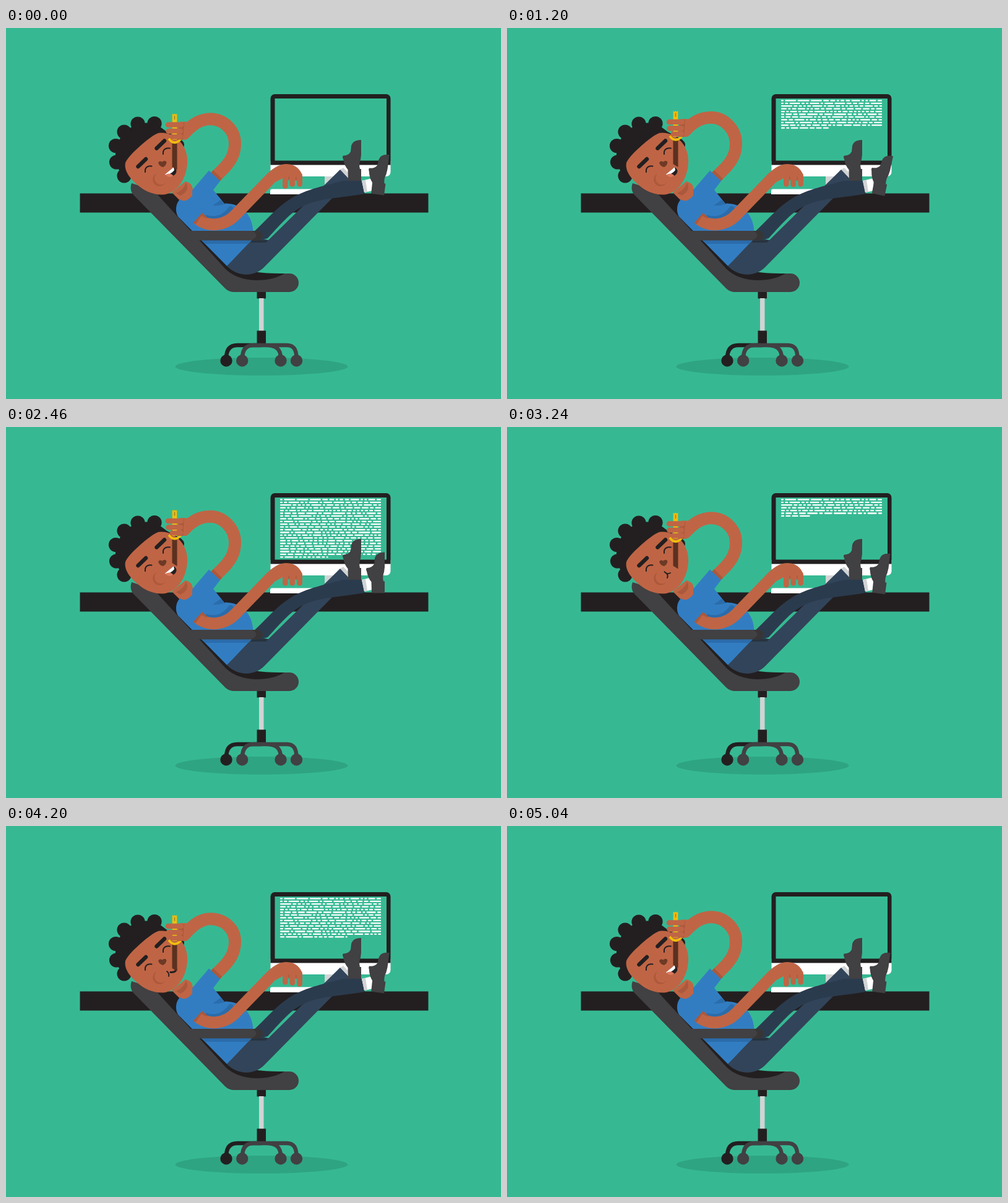
Write an HTML page with a canvas that moves like this. It is 800 px wide and 600 px high and loops after 5.07 s.

```html
<!DOCTYPE html>
<html lang="en">
<head>
<meta charset="utf-8">
<title>Taking a break</title>
<style>
html, body { margin: 0; width: 100%; height: 100%; overflow: hidden; background: #36b993; }
canvas { display: block; width: 800px; height: 600px; }
</style>
</head>
<body>
<canvas id="stage" width="800" height="600"></canvas>
<script>
const ctx = document.getElementById('stage').getContext('2d');
const LOOP = 5070, STEP = 60, CYCLE = 2520, BITE = 1260, TAP = 360;
const C = {
  bg: '#36b993', shade: '#2fa482', dark: '#231f20', gray: '#414042', light: '#d1d3d4',
  white: '#ffffff', skin: '#bf6545', skinDark: '#ab593c', brown: '#6d3a26', blade: '#5b3120',
  shirt: '#327dc2', shirtDark: '#2b6cab', pants: '#324459', pantsDark: '#2b3b4e', gold: '#f0bd0e'
};

function fill(d, color) {
  ctx.fillStyle = color;
  ctx.fill(new Path2D(d));
}
function line(d, color, width, cap = 'round') {
  ctx.strokeStyle = color;
  ctx.lineWidth = width;
  ctx.lineCap = cap;
  ctx.lineJoin = 'round';
  ctx.stroke(new Path2D(d));
}
function box(x, y, w, h, color, r = 0) {
  ctx.fillStyle = color;
  ctx.beginPath();
  ctx.roundRect(x, y, w, h, r);
  ctx.fill();
}
function dot(x, y, rx, color, ry = rx) {
  ctx.fillStyle = color;
  ctx.beginPath();
  ctx.ellipse(x, y, rx, ry, 0, 0, Math.PI * 2);
  ctx.fill();
}

const ease = x => {
  const k = Math.min(1, Math.max(0, x));
  return (1 - Math.cos(Math.PI * k)) / 2;
};

// Lines of code: each row is a run of dashes filling the same width
const ROWS = 22, LEFT = 443, RIGHT = 606;
let seed = 41;
const rnd = () => (seed = (seed * 16807) % 2147483647) / 2147483647;
const code = Array.from({ length: ROWS }, () => {
  const row = [];
  let x = LEFT;
  while (x < RIGHT - 2) {
    let w = 4 + Math.floor(rnd() * rnd() * 19);
    if (x + w > RIGHT - 6) w = RIGHT - x;
    row.push([x, w]);
    x += w + 2.3;
  }
  return row;
});

function drawCode(t) {
  const done = t / CYCLE * ROWS;
  code.forEach((row, i) => {
    const end = LEFT + (RIGHT - LEFT) * Math.min(1, done - i);
    for (const [x, w] of row) {
      const len = Math.min(w, end - x);
      if (len > 0) box(x, 116.2 + i * 4.43, len, 2.3, C.white, 0.8);
    }
  });
}

function drawDesk(t) {
  dot(413, 547.5, 139.5, C.shade, 14.5);
  box(119.5, 267.5, 563, 31, C.dark);
  box(515, 239, 27, 24, C.light);
  box(427, 260.5, 115, 8.5, C.white, [3, 0, 0, 0]);
  box(427.5, 215, 194, 25, C.white, [0, 0, 7, 7]);
  box(427.5, 107, 194, 114.5, C.dark, [7, 7, 0, 0]);
  box(434.5, 114, 180.5, 100.5, C.bg);
  drawCode(t);
}

function drawShoe() {
  fill('M574 181Q560 181 558 191L557 200Q554 206 545 206.5Q543 208 545 212Q547 223 552.5 229L553 247H574V228H572Q570 221 573 213L574 205Z', C.gray);
}

function drawLegs(t) {
  fill('M536 232L545 226L558 239L552 246Z', C.light);
  fill('M357 385L400 338L424 343L540 229L556 246L418 386C402 403 374 403 357 385Z', C.pants);
  fill('M399 331C420 312 436 291 460 276C486 260 520 254 545 247L575 247L580 268C542 275 506 275 480 288C458 299 440 322 423 340L400 347Z', C.pantsDark);
  fill('M575 247L592 243L593 263L579 266Z', C.white);
  fill('M575 247L581 246L584 265L579 266Z', C.light);
  drawShoe();
  const lift = Math.abs(Math.sin(Math.PI * (t - 300) / TAP)) ** 0.7;
  ctx.save();
  ctx.translate(596, 262);
  ctx.rotate(lift * 0.21);
  ctx.translate(-558, -240.5);
  drawShoe();
  ctx.restore();
}

function drawChair() {
  box(405.5, 425, 14.5, 12.5, C.dark);
  box(409, 437, 7.5, 54, C.light);
  box(405.5, 489.5, 14.5, 24, C.dark);
  line('M356 534C356 519 363 513 374 513H412', C.dark, 6.5);
  line('M382 534C382 519 389 513 400 513H454C465 513 469.5 520 469.5 534M420 513C436 513 444 519 444 534', C.gray, 6.5);
  dot(356, 538, 9.7, C.dark);
  [381.7, 444, 469.5].forEach(x => dot(x, 538, 9.7, C.gray));
  fill('M203 251C200 259 202 266 207 271L354 421Q360 427 369 427H458A15 15 0 0 0 458 397H380L250 266Z', C.gray);
  fill('M240 264L258 266L370 384Q395 398 450 397Q432 408 404 408Q373 407 355 390Z', C.dark);
}

function drawArm(a) {
  const top = 147 + a * 0.55;
  line(`M288 ${170 + a}C301 ${155 + a} 314 ${top} 330 ${top}C352 ${top} 370 165 370 187C370 204 363 215 353 226L334 245`, C.skin, 20);
  line('M342 237L334 245', C.skinDark, 20, 'butt');
}

function drawBody() {
  fill('M268 266L290 248Q301 250 302 262L301 275L285 283Z', C.skin);
  fill('M275 267Q287 262 291 250Q298 263 282 271Z', C.skinDark);
  fill('M281 277Q290 284 301 271L301 262L328 230.5L346 247.5L335 262L353 284C386 282 403 310 399 341L357 385L278 305C273 297 274 284 281 277Z', C.shirt);
  fill('M334 287Q347 288 359 283L353 284L347 278Z', C.shirtDark);
  fill('M315 343H396L391 349H322Z', C.shirtDark);
  fill('M398 343H424L420 347H395Z', '#27333f');
}

function drawHand(t) {
  const p = t % TAP;
  const finger = (x, at) => {
    const gap = Math.abs(p - at), d = Math.min(gap, TAP - gap);
    const tip = 252.5 + 4 * (1 - ease(d / 85));
    line(`M${x} 238V${tip}`, C.skin, 8.6);
  };
  line('M322 306Q347 314 363 292L372 302', C.shirtDark, 8, 'butt');
  line('M310 309C327 322 353 321 371 302L430 241', C.skin, 19, 'butt');
  fill('M302.5 315L317 299L326 307Q318 309 313 321Z', C.skinDark);
  line('M311 311C327 322 353 321 371 302L398 274', C.skin, 17, 'butt');
  fill('M422 236C434 224 444 220 453 220C469 220 479 231 479 243L470 247L447 243L436 249Z', C.skin);
  finger(451.3, 30);
  finger(462.7, 185);
  finger(474.6, 210);
  line('M457 241V246M468.7 241V246', C.skinDark, 1.4);
  fill('M293 328H407A7.7 7.7 0 0 1 407 343.5H308Z', C.gray);
  fill('M398 328H407A7.7 7.7 0 0 1 407 343.5H396Q412 336 398 328Z', '#373536');
}

function drawMouth(p) {
  if (p >= 840 || p < 90) {
    fill('M256.5 237L271 225Q278 229 274 236Q267 244 256.5 237Z', C.dark);
    fill('M256.5 237L271 225L272 230Q267 236 259 238Z', C.white);
    fill('M257 237.5Q265 233 270.5 239Q264 243.5 257 237.5Z', '#dd785d');
  } else if (p >= 600) {
    line('M254.5 234Q258 239 264 236M257 236Q261 239 259 244', C.dark, 1.9);
  } else {
    line('M275 231Q275 237 266 236.5', C.dark, 3);
    line('M260 235Q264 238 263 243', C.dark, 1.8);
  }
}

function drawHead(p) {
  fill('M190 245L176 216L178 190L191 167L214 154L240 153L260 168L284 181L287 196L250 230Z', C.dark);
  [[240, 154.5], [213, 155], [191, 168], [177.5, 190.5], [178.5, 217], [191, 239]]
    .forEach(([x, y]) => dot(x, y, 11.6, C.dark));
  dot(280, 189, 8, C.dark);
  fill('M193 218C196 207 235 173 246 170C270 166 292 187 293 212C294 239 280 264 258 269C241 272 223 263 214 255C203 246 190 232 193 218Z', C.skin);
  dot(248, 245, 10.8, '#ae593b');
  dot(250.5, 242.8, 10.4, C.skin);
  line('M213.5 224L226 212M243.5 194.5L256 182.5', C.dark, 6.5);
  line('M225 233C224 226 229 222 235.5 223.5M254 204C253 197 258 193 265 194.5', C.dark, 2);
  fill('M246 218Q248 214 252.5 216.5Q257 213 259.5 217Q259 222 254 225Q248 224 246 218Z', C.brown);
  drawMouth(p);
}

function drawSword(a) {
  ctx.save();
  ctx.translate(0, a);
  fill('M268.5 184H276.5V229L268.5 224Z', C.blade);
  fill('M268.7 138L270.7 139.5L272.5 138L274.3 139.5L276.3 138V180H268.7Z', C.gold);
  line('M272.5 142V147', '#a87812', 1.4);
  line('M263 178.5Q272.5 191 283 178.5', C.gold, 3.8, 'butt');
  box(278, 151, 17, 29, C.skin, 5);
  fill('M280 153H288L286 180H277Z', C.skinDark);
  line('M262 156H283M262.5 166.2H282M269 175H282', C.skin, 8.6);
  line('M269 161H276M269 170.7H276', C.gold, 1.6, 'butt');
  ctx.restore();
}

// Slow draw upward, short rest, quick plunge
function swordShift(p) {
  const q = p > 1100 ? p - BITE : p;
  const down = ease((q + 100) / 200), up = ease((q - 480) / 480);
  return -5 + 11 * (down - up);
}

function draw(now) {
  const t = Math.floor((now % LOOP) / STEP) * STEP % CYCLE;
  const p = t % BITE, shift = swordShift(p);
  ctx.fillStyle = C.bg;
  ctx.fillRect(0, 0, 800, 600);
  drawDesk(t);
  drawChair();
  drawLegs(t);
  drawArm(shift);
  drawBody();
  drawHand(t);
  drawHead(p);
  // The wrist overlaps the hair, so the arm's near end is painted again
  ctx.save();
  ctx.beginPath();
  ctx.rect(250, 120, 60, 80);
  ctx.clip();
  drawArm(shift);
  ctx.restore();
  drawSword(shift);
}

function tick() {
  draw(performance.now());
  requestAnimationFrame(tick);
}
tick();
</script>
</body>
</html>
```
